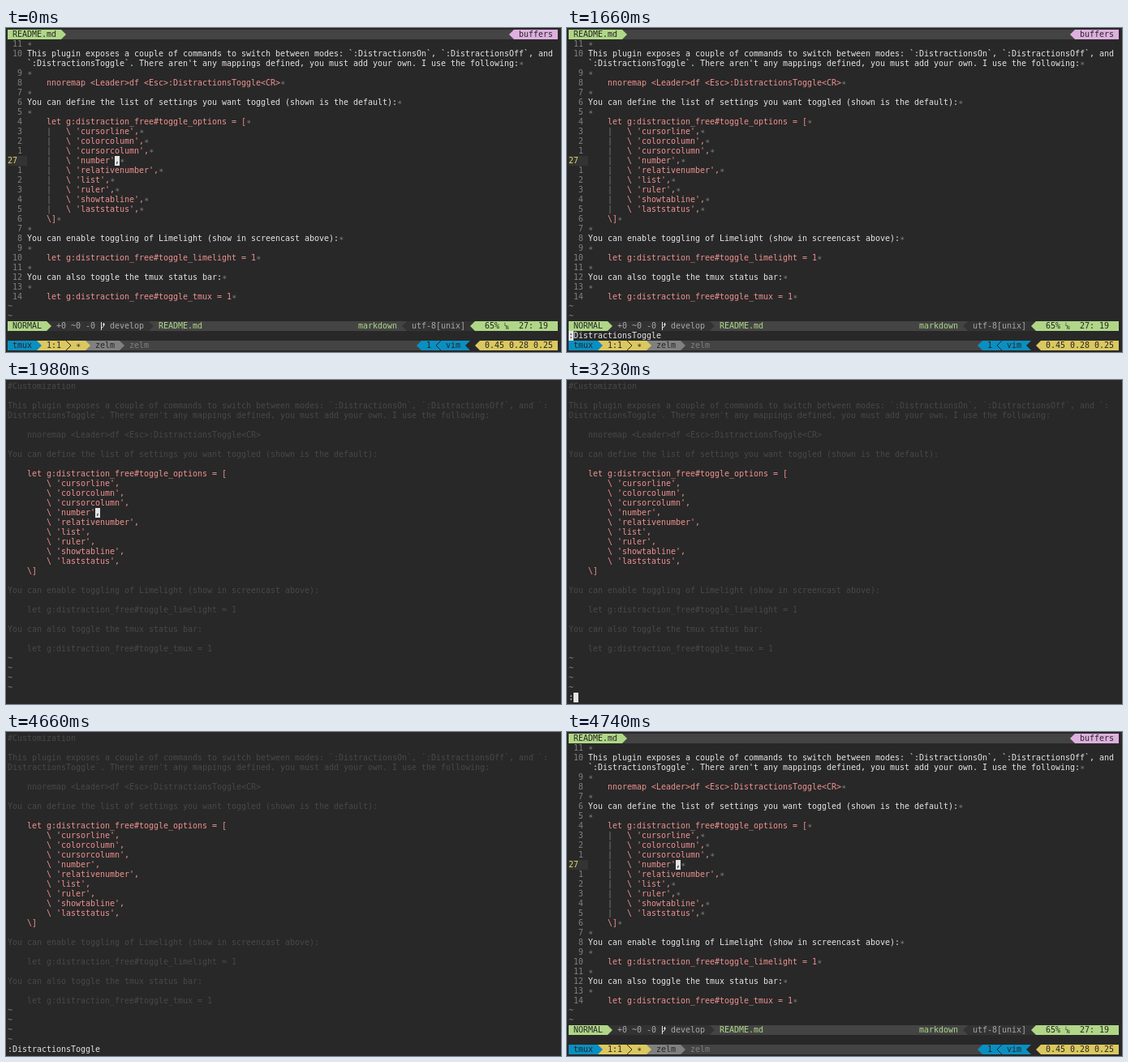
Recreate the animation shown at these times as an HTML page with a canvas. Size 684 by 400 pixels, loop 4.93 s.

```html
<!DOCTYPE html>
<html lang="en">
<head>
<meta charset="utf-8">
<title>Distraction-free editing</title>
<style>
  html, body { margin: 0; width: 100%; height: 100%; overflow: hidden; background: #282828; }
  canvas { display: block; }
</style>
</head>
<body>
<canvas id="stage" width="684" height="400"></canvas>
<script>
const ctx = document.getElementById('stage').getContext('2d');
const LOOP = 4930, CELL_W = 6, CELL_H = 12, MARGIN = 2, COLUMNS = 113;
const FONT = '10px "DejaVu Sans Mono", monospace';
const HOST = 'zelm';

const C = {
  bg: '#282828', text: '#e4e4e4', code: '#f09090', gray: '#808080', dim: '#484848',
  green: '#afd787', lime: '#afff4f', pink: '#dfafdf', blue: '#0a8fc2', yellow: '#dcc860',
  number: '#e0d45c', bar: '#444444', section: '#333333', barText: '#a8a8a8',
  hostBg: '#808080', ink: '#262626', gutter: '#333333'
};

const OPTIONS = ['cursorline', 'colorcolumn', 'cursorcolumn', 'number', 'relativenumber',
  'list', 'ruler', 'showtabline', 'laststatus'];
const INTRO = "This plugin exposes a couple of commands to switch between modes: " +
  "`:DistractionsOn`, `:DistractionsOff`, and ";
const INTRO_END = "DistractionsToggle`. There aren't any mappings defined, " +
  "you must add your own. I use the following:";
const COMMAND = ':DistractionsToggle';
const CURSOR_ROW = 13;

// Document lines by screen row; indented lines are code.
const doc = Array(28).fill('');
doc[5] = '    nnoremap <Leader>df <Esc>:DistractionsToggle<CR>';
doc[7] = 'You can define the list of settings you want toggled (shown is the default):';
doc[9] = '    let g:distraction_free#toggle_options = [';
OPTIONS.forEach((name, i) => doc[10 + i] = `        \\ '${name}',`);
doc[19] = '    \\]';
doc[21] = 'You can enable toggling of Limelight (show in screencast above):';
doc[23] = '    let g:distraction_free#toggle_limelight = 1';
doc[25] = 'You can also toggle the tmux status bar:';
doc[27] = '    let g:distraction_free#toggle_tmux = 1';

const cellX = col => MARGIN + col * CELL_W;
const cellY = row => MARGIN + row * CELL_H;

function fill(row, from, to, color) {
  ctx.fillStyle = color;
  ctx.fillRect(cellX(from), cellY(row), (to - from) * CELL_W, CELL_H);
}

function print(row, col, text, color) {
  ctx.fillStyle = color;
  [...text].forEach((ch, i) => {
    if (ch !== ' ') ctx.fillText(ch, cellX(col + i), cellY(row) + 9);
  });
}

function label(row, col, text, color, background) {
  fill(row, col, col + text.length, background);
  print(row, col, text, color);
}

// One-cell powerline arrow: dir 1 points right, -1 points left.
function arrow(row, col, dir, color, background, thin) {
  const base = cellX(dir > 0 ? col : col + 1), y = cellY(row);
  fill(row, col, col + 1, background);
  ctx.beginPath();
  ctx.moveTo(base, y);
  ctx.lineTo(base + dir * CELL_W, y + CELL_H / 2);
  ctx.lineTo(base, y + CELL_H);
  ctx.strokeStyle = ctx.fillStyle = color;
  if (thin) ctx.stroke(); else ctx.fill();
}

function branch(row, col, color) {
  const x = cellX(col), y = cellY(row);
  ctx.strokeStyle = color;
  ctx.beginPath();
  ctx.moveTo(x + 1.5, y + 1);
  ctx.lineTo(x + 1.5, y + 11);
  ctx.moveTo(x + 1.5, y + 8.5);
  ctx.lineTo(x + 4.5, y + 6);
  ctx.lineTo(x + 4.5, y + 2);
  ctx.moveTo(x + 3, y + 4);
  ctx.lineTo(x + 6, y + 4);
  ctx.stroke();
}

function lineMark(row, col) {
  ctx.fillStyle = C.ink;
  ctx.font = '6px "DejaVu Sans Mono", monospace';
  ctx.fillText('L', cellX(col), cellY(row) + 6);
  ctx.fillText('N', cellX(col) + 2, cellY(row) + 10);
  ctx.font = FONT;
}

function cursor(row, col, under = ' ') {
  label(row, col, under, C.ink, C.text);
}

function tmuxBar() {
  const row = 32;
  fill(row, 0, COLUMNS, C.bar);
  label(row, 0, ' tmux ', C.ink, C.blue);
  arrow(row, 6, 1, C.blue, C.yellow);
  label(row, 7, ' 1:1   ∗ ', C.ink, C.yellow);
  arrow(row, 12, 1, C.ink, C.yellow, true);
  arrow(row, 16, 1, C.yellow, C.hostBg);
  label(row, 17, ` ${HOST} `, C.ink, C.hostBg);
  arrow(row, 23, 1, C.hostBg, C.bar);
  print(row, 25, HOST, C.gray);
  arrow(row, 84, -1, C.blue, C.bar);
  label(row, 85, ' 1   vim ', C.ink, C.blue);
  arrow(row, 88, -1, C.ink, C.blue, true);
  arrow(row, 94, -1, C.bg, C.blue);
  fill(row, 95, 96, C.bg);
  arrow(row, 96, -1, C.yellow, C.bg);
  label(row, 97, ' 0.45 0.28 0.25 ', C.ink, C.yellow);
}

function statusLine() {
  const row = 30;
  fill(row, 0, COLUMNS, C.bar);
  label(row, 0, ' NORMAL ', C.ink, C.green);
  arrow(row, 8, 1, C.green, C.section);
  label(row, 9, ' +0 ~0 -0   develop ', C.barText, C.section);
  branch(row, 19, C.text);
  arrow(row, 29, 1, C.section, C.bar);
  print(row, 31, 'README.md', C.green);
  print(row, 72, 'markdown', C.green);
  arrow(row, 81, -1, C.section, C.bar);
  label(row, 82, ' utf-8[unix] ', C.barText, C.section);
  arrow(row, 95, -1, C.green, C.section);
  label(row, 96, '  65%    27: 19  ', C.ink, C.green);
  lineMark(row, 102);
}

function fullEditor() {
  fill(0, 0, COLUMNS, C.bar);
  label(0, 0, ' README.md ', C.ink, C.green);
  arrow(0, 11, 1, C.green, C.bar);
  arrow(0, 103, -1, C.pink, C.bar);
  label(0, 104, ' buffers ', C.ink, C.pink);

  for (let row = 1; row < doc.length; row++) {
    let line = doc[row];
    if (row === 2) line = INTRO;
    if (row === 3) line = '`:' + INTRO_END;
    const isCode = line.startsWith(' ');
    if (row === CURSOR_ROW) {
      label(row, 0, '27  ', C.number, C.gutter);
    } else if (row !== 3) {
      const distance = row < 3 ? 12 - row : Math.abs(row - CURSOR_ROW);
      print(row, 0, String(distance).padStart(3), C.gray);
    }
    print(row, 4, line, isCode ? C.code : C.text);
    if (line.startsWith('     ')) print(row, 8, '|', C.gray);
    if (row !== 2) print(row, 4 + line.length, '∗', C.gray);
  }
  for (const row of [28, 29]) print(row, 0, '~', C.gray);
  statusLine();
  tmuxBar();
}

function focusedEditor() {
  print(0, 0, '#Customization', C.dim);
  print(2, 0, INTRO + '`:', C.dim);
  print(3, 0, INTRO_END, C.dim);
  doc.forEach((line, row) => print(row, 0, line, row >= 9 && row <= 19 ? C.code : C.dim));
  for (let row = 28; row < 32; row++) print(row, 0, '~', C.gray);
}

function shell() {
  label(0, 0, ' ~/.vim/bundle/DistractionFree.vim ', C.ink, C.blue);
  arrow(0, 35, 1, C.blue, C.lime);
  label(0, 36, '   develop ', C.ink, C.lime);
  branch(0, 37, C.ink);
  arrow(0, 47, 1, C.lime, C.bg);
  print(0, 49, 'vim', C.lime);
  print(0, 53, 'README.md', C.text);
  ctx.fillRect(cellX(53), cellY(0) + 10, 9 * CELL_W, 1);
  cursor(1, 0);
}

// Command prompt: opened, then recalled in full, then submitted.
function prompt(row, t, recalledAt, submittedAt) {
  const text = t < recalledAt ? ':' : COMMAND;
  print(row, 0, text, C.text);
  if (t < submittedAt) cursor(row, text.length);
  else cursor(row, 0, ':');
}

function draw(t) {
  ctx.fillStyle = C.bg;
  ctx.fillRect(0, 0, 684, 400);
  if (t < 1940 || t >= 4740) {
    fullEditor();
    if (t < 660 || t >= 4740) cursor(CURSOR_ROW, 22, ',');
    else prompt(31, t, 1010, 1660);
  } else if (t < 1980) {
    shell();
  } else if (t < 4700) {
    focusedEditor();
    if (t < 3230) cursor(CURSOR_ROW, 18, ',');
    else if (t < 4660) prompt(32, t, 3700, 4390);
    else print(32, 0, COMMAND, C.text);
  } else {
    shell();
    tmuxBar();
  }
}

ctx.font = FONT;
const start = performance.now();
function tick() {
  draw((performance.now() - start) % LOOP);
  requestAnimationFrame(tick);
}
tick();
</script>
</body>
</html>
```
